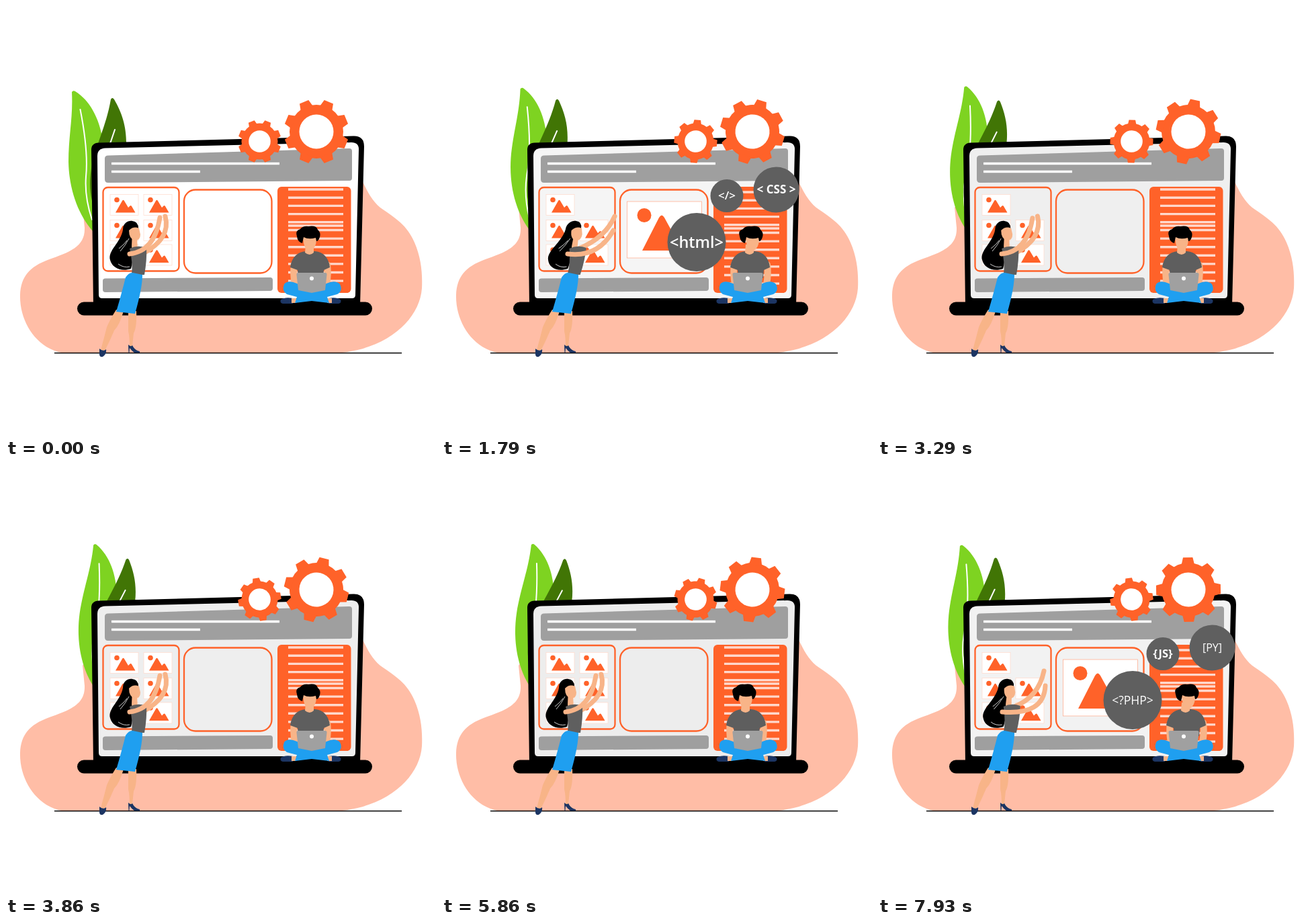
These frames come from a looping animation (640 px wide and 640 px high, 8 s). An HTML page:

```html
<!DOCTYPE html>
<html lang="en">
<head>
<meta charset="utf-8">
<title>Building a web page</title>
<style>
  html, body { margin: 0; width: 100%; height: 100%; overflow: hidden; background: #fff; }
  svg { display: block; width: 100vw; height: 100vh; }
  text { font-family: "Open Sans", "Noto Sans", sans-serif; fill: #fff; text-anchor: middle; }
  .arm { fill: none; stroke: #f8b488; stroke-width: 7; stroke-linecap: round; }
</style>
</head>
<body>
<svg viewBox="0 0 640 640">
  <defs>
    <g id="hills" fill="#ff6229">
      <circle cx="-11" cy="-7.5" r="3.8"/>
      <path d="M-13 11.5 L-3 -6 Q-1.500 -8.500 0 -6 L6 4 L8.500 1.500 Q10 .5 11 2 L16.500 11.500 Z"/>
    </g>
    <g id="thumb">
      <rect x="-21" y="-15.500" width="42" height="31" fill="#fff" stroke="#ffd9cb" stroke-width=".7"/>
      <use href="#hills"/>
    </g>
  </defs>

  <path fill="#ffbda6" d="M82 516 C45 508 20 470 21 430 C22 402 36 388 62 378 C96 366 118 358 117 330 L114 300 L150 250 L531 262 C539 278 545 290 557 300 C580 316 597 326 608 352 C618 375 620 398 619 420 C616 464 572 508 500 516 Z"/>
  <path d="M72 516.500 H589" stroke="#000" stroke-width="1.400"/>

  <g id="leafA">
    <path fill="#7ed321" d="M98 128 Q100 125 103 127 C124 140 139 166 144 200 L150 270 L136 342 C112 320 94 280 93 232 C93 192 100 166 98 128 Z"/>
    <path fill="none" stroke="#fff" stroke-width="2" stroke-linecap="round" d="M110.500 154 C118 192 122 224 119 254 C117 280 122 300 128 318"/>
  </g>
  <g id="leafB">
    <path fill="#417505" d="M156 139 Q158 135 161 139 C173 160 180 180 179 212 L160 260 L138 310 C125 296 123 266 127 242 C132 210 149 180 156 139 Z"/>
    <path fill="none" stroke="#fff" stroke-width="2" stroke-linecap="round" d="M162 184 Q157 200 150 217"/>
  </g>

  <path d="M127 214 Q127 204 138 203.500 L517 193.500 Q533 193 533 209 L527 446 H130 Z"/>
  <rect x="106" y="440.500" width="439" height="20" rx="10"/>
  <path id="screen" d="M136 223 Q136 212 148 211.500 L514 203 Q525.500 203 525 214 L520 430 Q520 435 515 435 H143 Q138 435 138 430 Z"/>
  <path fill="#9f9f9f" d="M147 227 Q147 222.500 152 222.500 L511 212 Q515 212 515 216 V256 Q515 260 511 260 L152 263 Q147 263 147 258 Z"/>
  <path stroke="#fff" stroke-width="3.500" d="M157 234.500 H407 M157 246.500 H289"/>
  <path fill="#9f9f9f" d="M148 405.500 L393 404 Q397 404 397 408 V420 Q397 424 393 424 L148 426 Q144 426 144 422 V409 Q144 405.500 148 405.500 Z"/>
  <g fill="none" stroke="#ff6229" stroke-width="2.300">
    <rect x="144.500" y="270" width="113" height="124.500" rx="7"/>
    <rect x="265" y="273.500" width="130.500" height="124" rx="17"/>
  </g>
  <rect x="404" y="269" width="109.500" height="158" rx="6" fill="#ff6229"/>
  <g id="lines" stroke="#ffd8cc" stroke-width="3.400"></g>
  <g id="cells"></g>
  <g id="gears" fill="#ff6229"></g>

  <g id="big">
    <rect x="-55.500" y="-42" width="111" height="84" fill="#fff" stroke="#ffa687" stroke-width=".7"/>
    <g fill="#ff6229">
      <circle cx="-30" cy="-21.500" r="10.500"/>
      <path d="M-33 31 L-8 -18 Q-4 -25 0 -18 L17 13 L24 5 Q27 2 30 6 L44 31 Z"/>
    </g>
  </g>
  <use id="moving" href="#thumb"/>

  <g id="woman">
    <g fill="#f8b488">
      <path d="M164 452 L175 454 Q169 475 161 483 Q154 500 147 513 L141 512 Q146 494 150 478 Q155 466 164 452 Z"/>
      <path d="M182 454 H194 Q195 478 190 487 L188 506 L184 508 Q184 492 182 484 Z"/>
    </g>
    <path fill="#1c3563" d="M139 510 Q145 515 149 511 Q150 518 144 522 Q139 523 139 518 Z M182 504 Q186 508 188 505 Q192 513 199 514 V516 H191 Q187 513 184 509 L183.500 516 H182.500 Z"/>
    <path id="armFar" class="arm"/>
    <g id="upper">
      <path fill="#f8b488" d="M184 342 L195 346 L196 362 L183 364 Z"/>
      <path d="M174 333 C174 323 182 319 188 320 Q197 321 197 331 Q192 330 188 334 L187 358 C190 372 188 384 186 391 C172 396 158 390 155 378 C151 364 171 352 174 333 Z"/>
      <path fill="#f8b488" d="M183 334 Q190 327 198 331 L200 340 Q200 349 192 349 Q183 347 183 334 Z"/>
      <path fill="#5f5f5f" d="M184 361 Q196 355 209 360 Q210 377 206 400 H187 Q189 382 184 361 Z"/>
      <path fill="none" stroke="#fff" stroke-width=".8" d="M183 346 Q178 356 170 365 M180 349 Q176 355 168 361 M167 384 Q175 390 184 388"/>
    </g>
    <path fill="#1f9ff0" d="M178 404 Q183 396 189 397 L203 400 Q203 420 192 458 L164 455 Q172 428 178 404 Z"/>
    <path id="armNear" class="arm"/>
  </g>

  <g id="man">
    <g id="torso">
      <path fill="none" stroke="#f8b488" stroke-width="10" stroke-linecap="round" d="M429 385 Q427 398 430 414 M478 385 Q480 398 477 414"/>
      <path fill="#5e5e5e" d="M446 365 H460 C473 366 481 376 482 389 L473 393 L472 405 H435 L434 393 L423 389 C425 374 434 366 446 365 Z"/>
      <path fill="#f8b488" d="M446 355 H458 V367 Q452 373 445 367 Z"/>
    </g>
    <g id="head">
      <path fill="#f8b488" d="M442 340 H462 Q463 356 457 362 Q452 366 447 362 Q442 356 442 340 Z"/>
      <path d="M433 343 Q430 334 438 332 Q442 327 450 328 Q462 326 464 333 Q469 337 467 344 Q465 350 462 350 L461 345 Q450 348 443 344 L441 353 Q434 351 433 343 Z"/>
    </g>
    <path fill="#1c3563" d="M409 437 Q415 433 427 435 V443 H412 Q407 442 409 437 Z M498 437 Q492 433 480 435 V443 H495 Q500 442 498 437 Z"/>
    <path stroke="#f8b488" stroke-width="7" d="M425 438.500 H432 M478 438.500 H485"/>
    <path fill="#1f9ff0" d="M433 413 Q420 407 414 414 Q410 424 418 429 L433 433 L430 442 L455 439 L481 442 L478 433 L493 429 Q502 424 497 414 Q490 407 477 413 L455 426 Z"/>
    <path fill="#a0a0a0" d="M435 397 H475 Q478 397 477.500 400 L475 423 L455 427 L435 423 L432.500 400 Q432 397 435 397 Z"/>
    <circle cx="455" cy="405.500" r="3" fill="#fff"/>
  </g>
  <g id="bubbles"></g>
</svg>

<script>
const LOOP = 8000, SHIFT = 5400, STEP = 1000 / 14;
const $ = id => document.getElementById(id);
const lerp = (a, b, k) => a + (b - a) * k;
const ramp = (t, a, b) => Math.min(1, Math.max(0, (t - a) / (b - a)));
const smooth = (t, a, b) => { const k = ramp(t, a, b); return k * k * (3 - 2 * k); };
const set = (el, name, value) => el.setAttribute(name, value);

function add(parent, tag, attrs, text) {
  const el = document.createElementNS("http://www.w3.org/2000/svg", tag);
  for (const k in attrs) set(el, k, attrs[k]);
  if (text) el.textContent = text;
  parent.append(el);
  return el;
}

// Value at t between [time, value] keys; values may be arrays
function track(keys, t, ease) {
  let i = 0;
  while (i < keys.length - 2 && t >= keys[i + 1][0]) i++;
  const [t0, a] = keys[i], [t1, b] = keys[i + 1];
  const k = ease(t, t0, t1);
  return Array.isArray(a) ? a.map((v, j) => lerp(v, b[j], k)) : lerp(a, b, k);
}

function makeGear(x, y, hole, body, outer) {
  const g = add($("gears"), "g");
  const pt = (r, deg) => {
    const a = deg * Math.PI / 180;
    return (r * Math.sin(a)).toFixed(2) + " " + (-r * Math.cos(a)).toFixed(2);
  };
  let d = "";
  for (let a = 0; a < 360; a += 45)
    d += `M${pt(body - 2, a - 15)}L${pt(outer, a - 8.5)}L${pt(outer, a + 8.5)}L${pt(body - 2, a + 15)}Z`;
  add(g, "circle", { r: body });
  add(g, "path", { d });
  add(g, "circle", { r: hole, fill: "#fff" });
  return deg => set(g, "transform", `translate(${x} ${y}) rotate(${deg})`);
}

function makeBubble(x, y, r, labels, inAt, inFor, outAt) {
  const g = add($("bubbles"), "g");
  add(g, "circle", { r, fill: "#5f5f5f" });
  const texts = labels.map(([text, size, weight, stretch = "normal"]) =>
    add(g, "text", { y: size * 0.35, "font-size": size, "font-weight": weight, "font-stretch": stretch }, text));
  return (u, round) => {
    const s = smooth(u, inAt, inAt + inFor) * (1 - smooth(u, outAt, outAt + 180));
    set(g, "transform", `translate(${x} ${y}) scale(${s})`);
    texts.forEach((el, i) => set(el, "display", i === round ? "inline" : "none"));
  };
}

// Two blocks of text lines meet at a narrow seam
for (let i = 0; i < 5; i++) add($("lines"), "path", { d: `M420 ${273 + i * 12.2}H502` });
add($("lines"), "path", { d: "M420 327H502" });
for (let i = 0; i < 7; i++) add($("lines"), "path", { d: `M420 ${333.5 + i * 12.6}H502` });

const cells = [];
for (const y of [296, 334, 370.5])
  for (const x of [176, 226])
    cells.push(add($("cells"), "use", { href: "#thumb", x, y }));

const bigGear = makeGear(462, 187, 25.5, 40, 48.5);
const smallGear = makeGear(377.5, 201.5, 16.3, 27, 32.3);
const bubbles = [
  makeBubble(424, 282.5, 24.5, [["</>", 17, 600], ["{JS}", 16.5, 700]], 1000, 220, 2620),
  makeBubble(497.5, 273.5, 34, [["< CSS >", 17, 700, "condensed"], ["[PY]", 16, 400]], 1150, 280, 2760),
  makeBubble(379, 351.5, 43.5, [["<html>", 23.5, 600], ["<?PHP>", 17.5, 400]], 1270, 290, 2920)
];

const bigTurn = [[0, 22.5], [1790, 17], [2710, 10], [3860, 14], [4930, 5], [6790, 9], [7930, -1]];
const smallTurn = [[0, 22.5], [1790, 5], [2710, -32], [3860, -55], [4930, -69], [6790, -77], [7930, -98]];

// Near arm, far arm (shoulder, bend, hand), then lean
const idle = [184, 369, 221, 365, 229, 315, 203, 369, 246, 346, 237, 313, 0];
const drag = [187, 369, 243, 365, 246, 321, 204, 358, 222, 348, 233, 331, .8];
const reach = [187, 369, 232, 375, 255, 334, 204, 361, 243, 345, 257, 313, 1];
const back = [185, 369, 247, 374, 249, 330, 203, 361, 239, 347, 247, 308, .5];
const poses = [[1150, idle], [1390, drag], [1650, reach], [1850, reach], [2250, back], [2850, back], [3350, idle]];
const limb = p => `M${p[0]} ${p[1]}Q${p[2]} ${p[3]} ${p[4]} ${p[5]}`;

function draw(t) {
  const sway = (1 - Math.cos(t / 2400 * 2 * Math.PI)) / 2;
  set($("leafA"), "transform", `rotate(${9.7 * sway} 162 337)`);
  set($("leafB"), "transform", `rotate(${9.7 * sway} 144 289)`);
  const grey = Math.round(255 - 19 * sway);
  set($("screen"), "fill", `rgb(${grey},${grey},${grey})`);
  bigGear(track(bigTurn, t, ramp));
  smallGear(track(smallTurn, t, ramp));

  const round = t < 4400 ? 0 : 1;
  const u = t - round * SHIFT;
  bubbles.forEach(b => b(u, round));

  // The picture leaves its cell, moves over and grows into the middle panel
  const go = smooth(u, 1220, 1730), size = lerp(1, 2.64, smooth(u, 1400, 1730));
  const gone = 1 - smooth(u, 3000, 3250);
  const place = `translate(${lerp(226, 331, go)} ${lerp(296, 333, go)})`;
  const landed = u >= 1730;
  set($("moving"), "transform", `${place} scale(${size})`);
  set($("moving"), "display", u > 1220 && !landed ? "inline" : "none");
  set($("big"), "transform", `${place} scale(${gone})`);
  set($("big"), "display", landed && gone > 0 ? "inline" : "none");
  set(cells[1], "opacity", u <= 1220 ? 1 : smooth(u, 3300, 3550));

  const pose = track(poses, u, smooth), k = pose[12] * .15;
  set($("armNear"), "d", limb(pose.slice(0, 6)));
  set($("armFar"), "d", limb(pose.slice(6, 12)));
  set($("upper"), "transform", `matrix(1 0 ${-k} 1 ${k * 398} 0)`);

  const m = smooth(u, 850, 1350) * (1 - smooth(u, 2650, 3300));
  set($("torso"), "transform", `translate(${6 * m} 0)`);
  set($("head"), "transform", `translate(${10 * m} 0)`);
  set($("lines"), "transform", `translate(0 ${4 * m})`);
}

function tick(now) {
  const t = now % LOOP;
  draw(Math.floor(t / STEP + .1) * STEP);
  requestAnimationFrame(tick);
}
draw(0);
requestAnimationFrame(tick);
</script>
</body>
</html>
```
